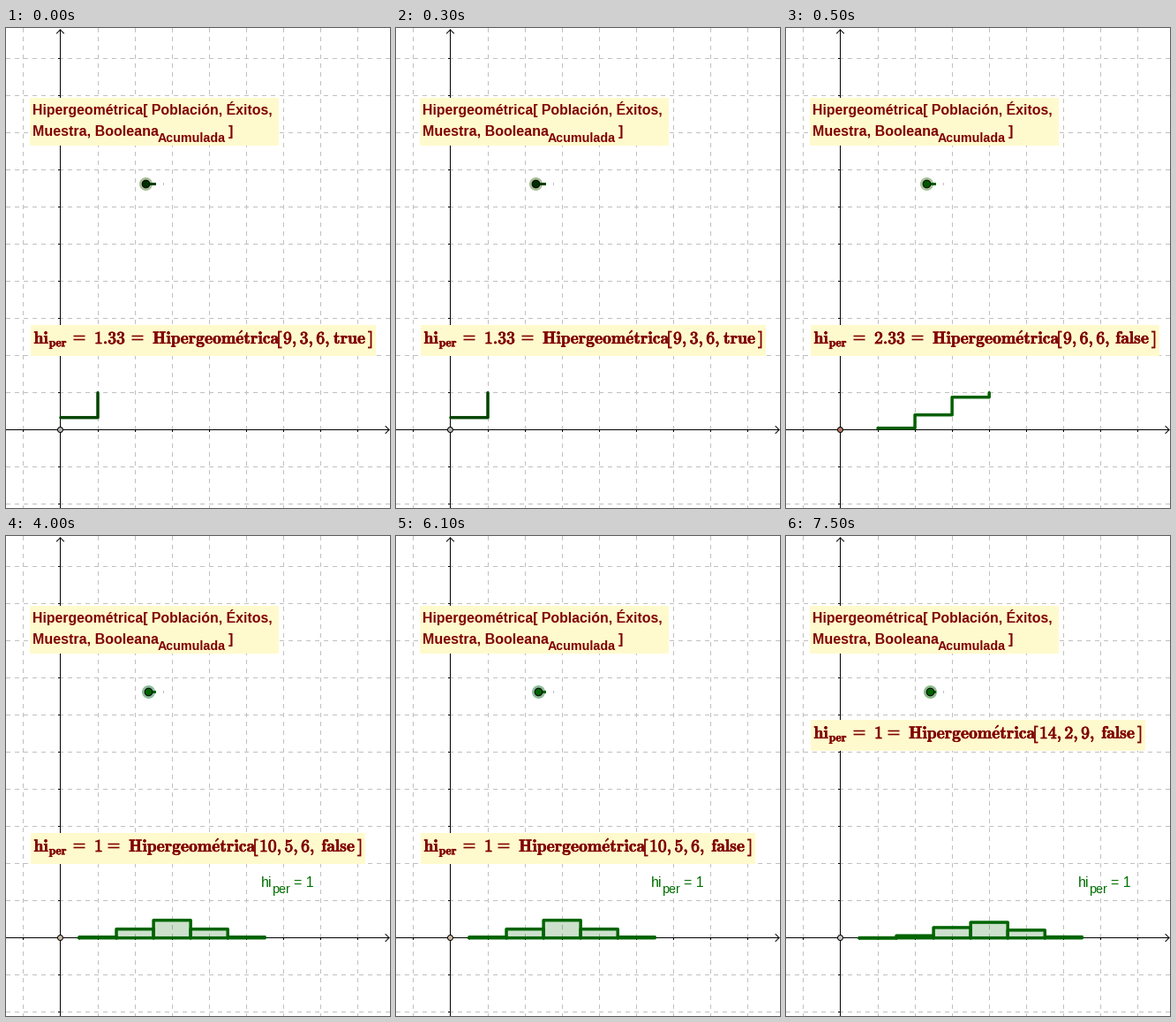
These frames come from a looping animation (435 px wide and 543 px high, 8 s). A matplotlib script:

```python
from math import comb, floor

import matplotlib.pyplot as plt
from matplotlib.animation import FuncAnimation
from matplotlib.patches import Circle, Rectangle
from matplotlib.patheffects import withStroke

W, H, DPI = 435, 543, 64
PX = 72 / DPI                 # points per pixel
OX, OY, UNIT = 61.95, 454.7, 42.06
MAROON, CREAM = "#800000", "#fffacd"

plt.rcParams["mathtext.fontset"] = "cm"
plt.rcParams["font.family"] = "Liberation Sans"

fig = plt.figure(figsize=(W / DPI, H / DPI), dpi=DPI, facecolor="white")
ax = fig.add_axes([0, 0, 1, 1])

# dist: (population, successes, sample) of the plotted distribution
SCENES = [
    dict(until=1, value="1.33", args="9,3,6,", flag="true", right=419,
         top=336, kind="cdf", dist=(3, 1, 2), dot=158.5, line="#004400",
         fill="#003000", halo="#a9bd97", origin="#b4b4b4"),
    dict(until=8, value="2.33", args="9,6,6,", flag="false", right=423,
         top=336, kind="cdf", dist=(9, 4, 6), dot=159.5, line="#006000",
         fill="#005800", halo="#a6c296", origin="#b47868"),
    dict(until=15, value="1", args="10,5,6,", flag="false", right=407,
         top=336, kind="pmf", dist=(10, 5, 6), dot=161.5, line="#006400",
         fill="#006400", halo="#90bc9c", origin="#c8b8a0", label=289),
    dict(until=16, value="1", args="14,2,9,", flag="false", right=407,
         top=208, kind="pmf", dist=(14, 6, 9), dot=163.5, line="#006400",
         fill="#006400", halo="#8cba8c", origin="#c4c4c4", label=331),
]


def to_px(x, y):
    return OX + UNIT * x, OY - UNIT * y


def centre(v):
    """Middle of the pixel that holds v."""
    return floor(v) + .5


def stroke(points, color, width=1, z=2, **kw):
    xs, ys = zip(*points)
    ax.plot(xs, ys, color=color, lw=width * PX, zorder=z, snap=False, **kw)


def thick(points, color):
    stroke(points, color, 3.5, z=3, solid_capstyle="round",
           solid_joinstyle="round")


def write(x, y, text, size, color=MAROON, bold=True, **kw):
    ax.text(x, y, text, fontsize=size * PX, color=color, zorder=6,
            va="baseline", weight="bold" if bold else "normal", **kw)


def write_math(x, y, text, extra=.4, **kw):
    outline = withStroke(linewidth=extra * PX, foreground=MAROON)
    write(x, y, f"${text}$", 19.6, path_effects=[outline], **kw)


def panel(x0, y0, x1, y1):
    ax.add_patch(Rectangle((x0, y0), x1 - x0, y1 - y0, fc=CREAM, lw=0,
                           zorder=5))


def disc(x, y, r, face, edge="none", z=4):
    ax.add_patch(Circle((x, y), r, fc=face, ec=edge, lw=PX, zorder=z))


def grid_and_axes():
    dash = dict(ls=(0, (5, 5)), dash_capstyle="butt")
    ax_x, ax_y = centre(OX), centre(OY)
    for k in range(-1, 9):
        x = centre(OX + UNIT * k)
        if k:
            stroke([(x, 0), (x, H)], "#c0c0c0", z=1, **dash)
            stroke([(x, ax_y), (x, ax_y + 2)], "black")
    for k in range(-2, 11):
        y = centre(OY - UNIT * k)
        if k:
            stroke([(0, y), (W, y)], "#c0c0c0", z=1, **dash)
            stroke([(ax_x - 2, y), (ax_x, y)], "black")
    stroke([(0, ax_y), (W - 1, ax_y)], "black")
    stroke([(ax_x, 2), (ax_x, H)], "black")
    stroke([(W - 5, ax_y - 4), (W - 1, ax_y), (W - 5, ax_y + 4)], "black")
    stroke([(ax_x - 4, 6), (ax_x, 2), (ax_x + 4, 6)], "black")


def heading():
    panel(27, 79, 309, 133)
    write(30, 98, "Hipergeométrica[ Población, Éxitos,", 15.85)
    write(30, 122, "Muestra, Booleana", 16)
    write(171.5, 129, "Acumulada", 14.2)
    write(251.5, 122, "]", 16)


def equals(x, base):
    for dy in (8.5, 4.5):
        stroke([(x, base - dy), (x + 13, base - dy)], MAROON, 1.6, z=6,
               solid_capstyle="butt")


def bracket(x, base, side):
    tip = x + 3.5 * side
    stroke([(tip, base - 13.5), (x, base - 13.5), (x, base + 4.5),
            (tip, base + 4.5)], MAROON, 1.8, z=6,
           solid_capstyle="butt", solid_joinstyle="miter")


def formula(s):
    base = s["top"] + 21
    name_x = 166 if len(s["value"]) > 1 else 139
    panel(28, s["top"], s["right"], s["top"] + 35)
    write_math(31.5, base, r"\mathbf{hi}_{\mathbf{per}}")
    equals(76.5, base)
    write_math(100, base, s["value"], .9)
    equals(name_x - 23.5, base)
    write_math(name_x, base, r"\mathbf{Hipergeom\acute{e}trica}")
    bracket(name_x + 143, base, 1)
    write_math(name_x + 148, base, s["args"], .9)
    write_math(s["right"] - 10.5, base, r"\mathbf{%s}" % s["flag"],
               ha="right")
    bracket(s["right"] - 5.5, base, -1)


def pmf(population, successes, sample):
    low = max(0, sample + successes - population)
    total = comb(population, sample)
    return [(k, comb(successes, k) * comb(population - successes, sample - k)
             / total) for k in range(low, min(successes, sample) + 1)]


def steps(s):
    points, total = [], 0
    for k, p in pmf(*s["dist"]):
        total += p
        points += [to_px(k, total), to_px(k + 1, total)]
    thick(points[:-1], s["line"])


def bars(s):
    for k, p in pmf(*s["dist"]):
        corners = [to_px(k + dx, y) for dx, y in
                   ((-.5, 0), (-.5, p), (.5, p), (.5, 0), (-.5, 0))]
        ax.fill(*zip(*corners), color="#006400", alpha=.2, lw=0, zorder=3)
        thick(corners, s["line"])
    x, green = s["label"], "#007000"
    write(x, 397, "hi", 16, green, False)
    write(x + 12.3, 404, "per", 14.4, green, False)
    write(x + 37, 397, "= 1", 16, green, False)


def slider(s):
    x, y = s["dot"], 176.5
    disc(x, y, 7.5, s["halo"], z=3)
    stroke([(x, y), (170, y)], s["line"], 3, z=4, solid_capstyle="butt")
    disc(x, y, 4.3, s["fill"], "black", z=5)
    stroke([(178.5, y - 1.5), (178.5, y + 1.5)], "#c0c0c0",
           solid_capstyle="butt")


def draw(i):
    s = next(scene for scene in SCENES if i < scene["until"])
    ax.clear()
    ax.set(xlim=(0, W), ylim=(H, 0))
    ax.axis("off")
    grid_and_axes()
    heading()
    slider(s)
    (steps if s["kind"] == "cdf" else bars)(s)
    formula(s)
    disc(centre(OX), centre(OY), 3, s["origin"], "black")
    return []


anim = FuncAnimation(fig, draw, frames=16, interval=500, init_func=lambda: [],
                     repeat=True, repeat_delay=0, blit=False)
plt.show()
```
